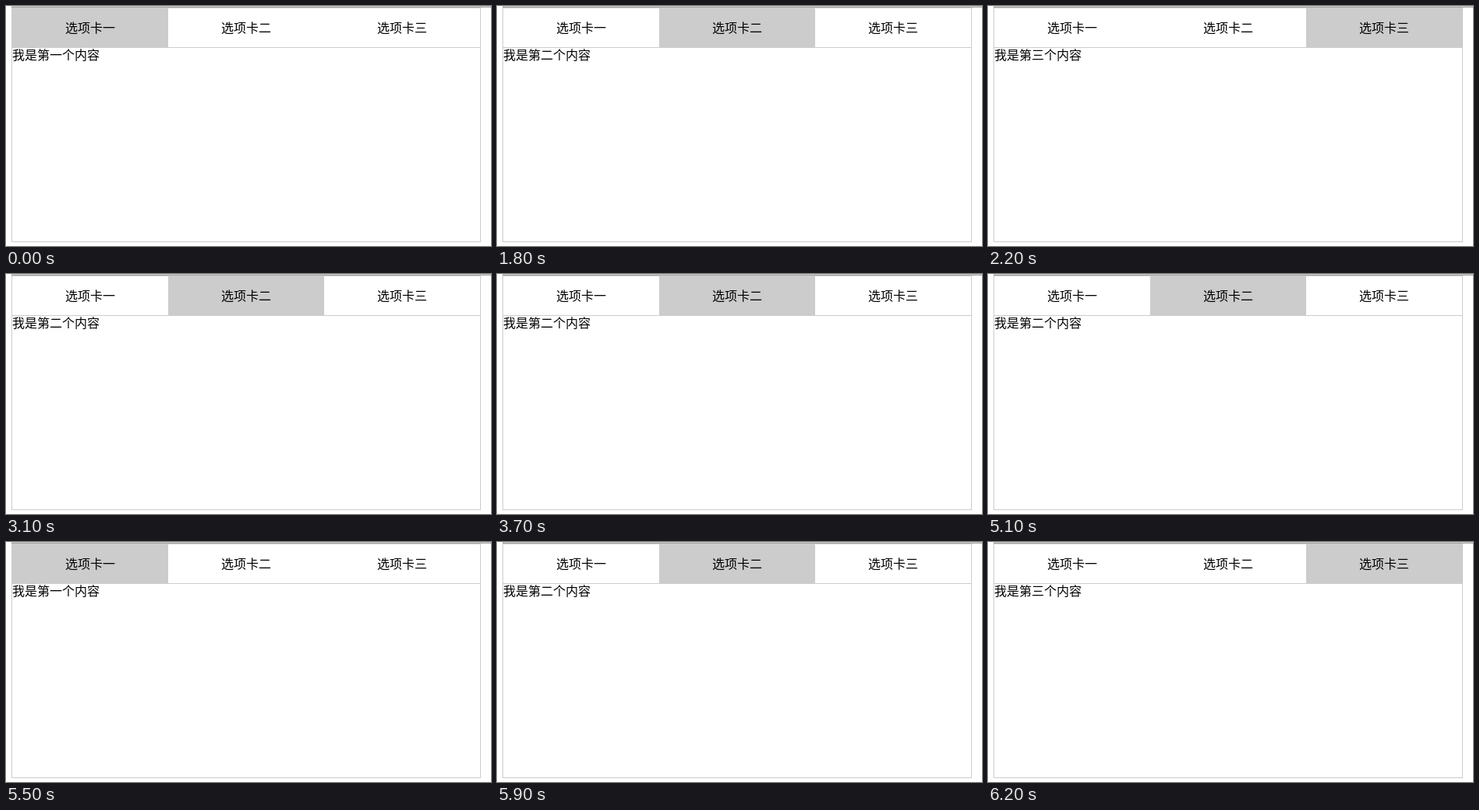
An HTML page that plays this animation: 622 px wide and 309 px high, repeating every 8.2 s.

```html
<!DOCTYPE html>
<html lang="zh-CN">
<head>
<meta charset="utf-8">
<title>选项卡</title>
<style>
* { margin: 0; box-sizing: border-box; }
html, body { width: 100%; height: 100%; overflow: hidden; background: #fff; }
body { position: relative; font: 300 16px "Noto Sans CJK SC", "Noto Sans CJK", sans-serif; color: #000; }
.rule { position: absolute; left: 7px; right: 0; top: 0; height: 2px; background: #ccc; border-bottom: 1px solid #a0a0a0; }
.box { position: absolute; left: 7px; top: 2px; width: 602px; height: 302px; border: 1px solid #ccc; }
.tabs { display: flex; height: 51px; border-bottom: 1px solid #ccc; }
.tab { width: 200px; line-height: 48px; height: 50px; text-align: center; }
.tab.on { background: #ccc; }
.panel { line-height: 16px; }
</style>
</head>
<body>
<div class="rule"></div>
<div class="box">
  <div class="tabs">
    <div class="tab">选项卡一</div>
    <div class="tab">选项卡二</div>
    <div class="tab">选项卡三</div>
  </div>
  <div class="panel"></div>
</div>
<script>
const LOOP = 8200;
// [start ms, selected tab]
const steps = [
  [0, 0], [1800, 1], [2200, 2], [3100, 1], [3200, 0], [3700, 1],
  [4200, 2], [5100, 1], [5500, 0], [5900, 1], [6200, 2]
];
const tabs = document.querySelectorAll('.tab');
const panel = document.querySelector('.panel');
let shown = -1;

function select(index) {
  if (index === shown) return;
  shown = index;
  tabs.forEach((tab, i) => tab.classList.toggle('on', i === index));
  panel.textContent = `我是第${'一二三'[index]}个内容`;
}

function draw() {
  const t = performance.now() % LOOP;
  select(steps.findLast(([start]) => start <= t)[1]);
  requestAnimationFrame(draw);
}
draw();
</script>
</body>
</html>
```
